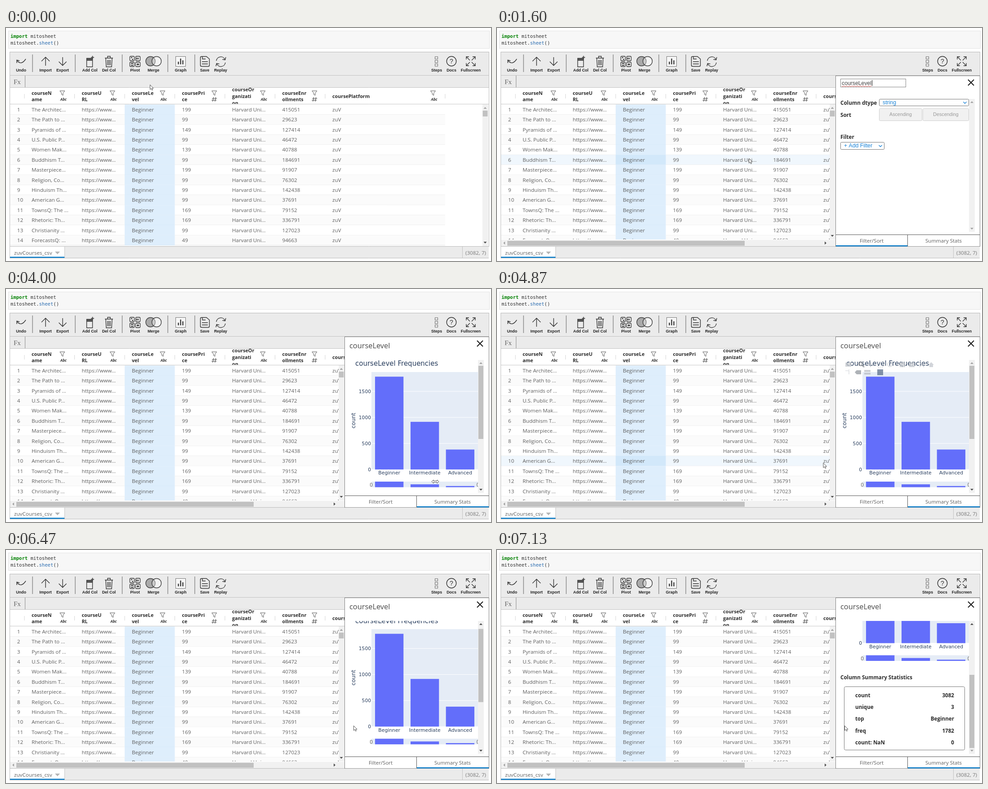
An HTML page with a canvas for the animation above (8000 ms loop, 1079x519 px).

```html
<!DOCTYPE html>
<html lang="en">
<head>
<meta charset="utf-8">
<title>Column summary</title>
<style>
html, body { margin: 0; width: 100%; height: 100%; overflow: hidden; background: #fff; }
canvas { display: block; }
</style>
</head>
<body>
<canvas id="stage" width="1079" height="519"></canvas>
<script>
const ctx = document.getElementById('stage').getContext('2d');
const LOOP = 8000;
const SANS = '"Open Sans", "Noto Sans", sans-serif';
const ARIAL = '"Liberation Sans", Arial, sans-serif';
const CHART = '"DejaVu Sans", sans-serif';
const MONO = '"DejaVu Sans Mono", monospace';
const GREY = '#5e5e5e', INK = '#2b2b2b', BLUE = '#1b84d8';
const ROW_TOP = 170.5, ROW_H = 22.38, COL_X = 41, COL_W = 111.5;

const columns = [
  { lines: ['courseN', 'ame'], type: 'Abc' },
  { lines: ['courseU', 'RL'], type: 'Abc' },
  { lines: ['courseLe', 'vel'], type: 'Abc' },
  { lines: ['coursePri', 'ce'], type: '#' },
  { lines: ['courseOr', 'ganizati', 'on'], type: 'Abc' },
  { lines: ['courseEnr', 'ollments'], type: '#' },
  { lines: ['coursePlatform'], type: 'Abc' }
];
const rows = [
  ['The Architec...', 199, 415051], ['The Path to ...', 99, 29623],
  ['Pyramids of ...', 149, 127414], ['U.S. Public P...', 99, 46472],
  ['Women Mak...', 139, 40788], ['Buddhism T...', 99, 184691],
  ['Masterpiece...', 199, 91907], ['Religion, Co...', 99, 76302],
  ['Hinduism Th...', 99, 142438], ['American G...', 99, 37691],
  ['TownsQ: The ...', 169, 79152], ['Rhetoric: Th...', 169, 336791],
  ['Christianity ...', 99, 127023], ['ForecastsQ: ...', 49, 94663]
].map(([name, price, enrolled]) =>
  [name, 'https://www...', 'Beginner', price, 'Harvard Uni...', enrolled, 'zuV']);

// y is the middle of the capital letters
function text(s, x, y, size = 11.65, color = GREY, family = SANS, style = '', align = 'left') {
  ctx.font = `${style} ${size}px ${family}`;
  ctx.fillStyle = color;
  ctx.textAlign = align;
  ctx.fillText(s, x, y + size * 0.357);
}
const bold = (s, x, y, size = 11.65, align = 'left') => text(s, x, y, size, INK, SANS, 'bold', align);

function rect(x, y, x2, y2, fill, stroke) {
  if (fill) { ctx.fillStyle = fill; ctx.fillRect(x, y, x2 - x, y2 - y); }
  if (stroke) {
    ctx.strokeStyle = stroke; ctx.lineWidth = 1;
    ctx.strokeRect(x + 0.5, y + 0.5, x2 - x - 1, y2 - y - 1);
  }
}
function roundBox(x, y, x2, y2, r, fill, stroke) {
  ctx.beginPath();
  ctx.roundRect(x + 0.5, y + 0.5, x2 - x - 1, y2 - y - 1, r);
  ctx.fillStyle = fill; ctx.fill();
  ctx.strokeStyle = stroke; ctx.lineWidth = 1; ctx.stroke();
}
function path(d, stroke = '#333', width = 1.4, fill) {
  const p = new Path2D(d);
  if (fill) { ctx.fillStyle = fill; ctx.fill(p); }
  if (stroke) { ctx.strokeStyle = stroke; ctx.lineWidth = width; ctx.stroke(p); }
}
function circle(x, y, r, stroke, fill, width = 1.4) {
  ctx.beginPath();
  ctx.arc(x, y, r, 0, 7);
  if (fill) { ctx.fillStyle = fill; ctx.fill(); }
  if (stroke) { ctx.strokeStyle = stroke; ctx.lineWidth = width; ctx.stroke(); }
}
function clipped(x, y, x2, y2, draw) {
  ctx.save();
  ctx.beginPath();
  ctx.rect(x, y, x2 - x, y2 - y);
  ctx.clip();
  draw();
  ctx.restore();
}
const ramp = (t, a, b) => Math.min(1, Math.max(0, (t - a) / (b - a)));
const smooth = p => p * p * (3 - 2 * p);

function drawCode() {
  rect(5, 6, 1076, 46, '#f7f7f7', '#e3e3e3');
  text('import', 10, 18.5, 10.55, '#008000', MONO, 'bold');
  text('mitosheet', 54.4, 18.5, 10.55, '#333', MONO);
  text('mitosheet.', 10, 33.5, 10.55, '#333', MONO);
  text('sheet', 73.5, 33.5, 10.55, '#2a6cb0', MONO);
  text('()', 105.3, 33.5, 10.55, '#333', MONO);
}

function drawToolbar() {
  rect(8, 53, 1074, 133, '#ebebeb');
  path('M8 53.5H1074', '#b5b5b5', 1);
  path('M8 105.5H1074M8 132.5H1074', '#c2c2c2', 1);
  path('M42.5 106V132', '#8a8a8a', 1);
  text('Fx', 17, 119.5, 15, '#666', '"Liberation Serif", serif');
  for (const x of [59, 154, 258.5, 360, 420]) path(`M${x} 59V98`, '#858585', 1.4);

  const labels = { Undo: 33.5, Import: 88, Export: 126, 'Add Col': 186.5, 'Del Col': 229, Pivot: 287,
    Merge: 328, Graph: 388.5, Save: 442, Replay: 477.5, Steps: 958, Docs: 991, Fullscreen: 1034 };
  for (const name in labels) text(name, labels[name], 94, 8.9, '#222', ARIAL, 'bold', 'center');

  path('M25 73Q34 84 44 69M24 78V71.5L30 73');
  path('M88 84V65M79 74L88 65L97 74M126 65V83M117.5 75L126 83.5L134.5 75');
  path('M179.5 67.5H192.5V86.5H179.5Z');
  rect(180, 68, 192, 73, '#555');
  path('M192.5 62V69M189 65.5H196', '#333', 1.5);
  path('M220 67H238M226 67V63H232V67M222 67L223 86.5H235L236 67M226 71V83M229 71V83M232 71V83');
  for (const [x, y] of [[275.5, 63], [288.5, 63], [275.5, 76], [288.5, 76]]) {
    ctx.beginPath(); ctx.roundRect(x, y, 10, 10, 2);
    ctx.strokeStyle = '#333'; ctx.lineWidth = 1.3; ctx.stroke();
  }
  path('M278 66H281M280 70H283M291 66V70M294 66V70M278 79H283M278 83H283M291 81H296M293.5 78.5V83.5', '#333', 1.8);
  circle(321.5, 74, 10.5, '#444', '#aaa');
  circle(335, 74, 10.5, '#444', '#fff6');
  rect(377, 63, 400, 86, '#f7f7f7', '#777');
  path('M383.5 81V75M388.5 81V68M393.5 81V72', '#333', 2.3);
  path('M435 63.5H446L452.5 69V83Q452.5 85.5 450 85.5H435Q432.5 85.5 432.5 83V66Q432.5 63.5 435 63.5ZM437 64V69H444M436 75H449M436 80H449');
  path('M468 73A10 10 0 0 1 487 70M488 77A10 10 0 0 1 469 80M489 65L487.5 71L481.5 70M467 85L468.5 79L474.5 80');
  for (const y of [63.5, 71.5, 79.5]) rect(954, y, 961, y + 6, '#f4f4f4', '#666');
  circle(991, 74, 10.7, '#333');
  text('?', 991, 74, 14, '#333', ARIAL, '', 'center');
  path('M1024 64L1032 72M1044 64L1036 72M1024 84L1032 76M1044 84L1036 76M1024 70V64H1030M1038 64H1044V70M1044 78V84H1038M1030 84H1024V78', '#333', 1.3);
}

function arrow(x, y, dir, color) {
  const [a, b] = dir === 'up' ? [2, -2] : [-2, 2];
  path(dir === 'left' || dir === 'right'
    ? `M${x + (dir === 'left' ? 2 : -2)} ${y - 3.5}v7L${x + (dir === 'left' ? -2 : 2)} ${y}Z`
    : `M${x - 3.5} ${y + a}h7L${x} ${y + b}Z`, null, 0, color);
}

function drawHeader(right, hoverCol) {
  rect(8, 133, right, 170, '#fff');
  clipped(8, 133, right, 169, () => {
    columns.forEach(({ lines, type }, i) => {
      const x = COL_X + COL_W * i, wide = i === 6;
      path(`M${x} 147V157`, '#d5d5d5', 1);
      lines.forEach((line, n) => {
        const y = 152.2 + (n - (lines.length - 1) / 2) * 14.7;
        bold(line, x + 16, y, 10.75);
        if (i === hoverCol) rect(x + 16, y + 5.4, x + 16 + ctx.measureText(line).width, y + 6.4, INK);
      });
      const fx = wide ? 950 : x + 84.3 + (type === '#' ? 3.5 : 0);
      path(`M${fx - 5.5} 140H${fx + 5.5}L${fx + 1.6} 145V150L${fx - 1.6} 148V145Z`, '#555', 1);
      if (type === '#')
        path(`M${fx - 1.5} 154L${fx - 3.5} 164M${fx + 3.5} 154L${fx + 1.5} 164M${fx - 5} 157H${fx + 6}M${fx - 6} 161H${fx + 5}`, '#444', 1);
      else text(type, fx + 2.5, 159.5, 8.3, '#333', SANS, 'italic bold', 'center');
    });
    path('M977 147V157', '#d5d5d5', 1);
  });
  path(`M8 169.5H${right}`, '#c8c8c8', 1);
}

function drawRows(right, bottom, hoverRow) {
  rect(8, 170, right, 487, '#fff');
  clipped(8, 170, right - 14, bottom, () => {
    rows.forEach((cells, i) => {
      const y = ROW_TOP + ROW_H * i, on = i === hoverRow;
      rect(8, y, 977, y + ROW_H, on ? '#f0f7fd' : i % 2 ? '#fbfbfb' : '#fff');
      rect(264, y, 375.5, y + ROW_H, on ? '#d2e8fa' : '#deeefc');
      path(`M8 ${y + ROW_H}H264M375.5 ${y + ROW_H}H977`, '#e6e6e6', 1);
      path(`M264 ${y + ROW_H}H375.5`, '#d3e6f5', 1);
      text(i + 1, i < 9 ? 28 : 31.5, y + 11.3, 11.65, GREY, SANS, '', 'center');
      cells.forEach((cell, c) => text(cell, COL_X + COL_W * c + 16, y + 11.3));
    });
  });
  const x = right - 8;
  rect(right - 14, 170, right - 1, bottom, '#f1f1f1');
  rect(x - 5.5, 184, x + 5.5, 197, '#c1c1c1');
  arrow(x, 178, 'up', '#a3a3a3');
  arrow(x, bottom - 8, 'down', '#505050');
  if (bottom < 480) {
    rect(9, 472, right - 1, 486, '#f1f1f1');
    rect(23, 474, 551, 485, '#c1c1c1');
    arrow(16, 479, 'left', '#a3a3a3');
    arrow(731, 479, 'right', '#505050');
  }
}

function drawFooter() {
  rect(8, 486, 1074, 513, '#ebebeb');
  path('M8 486.5H1074M8 512.5H1074', '#bbb', 1);
  rect(9, 487, 131, 512, '#fff');
  rect(9, 509.5, 131, 512, '#0f80cc');
  path('M130.5 487V512M1015.5 487V512', '#c4c4c4', 1);
  text('zuvCourses_csv', 18, 500.5);
  path('M109 498H120L114.5 504Z', null, 0, '#b5b5b5');
  text('(3082, 7)', 1068, 500.5, 11.65, '#7a7a7a', SANS, '', 'right');
  path('M8.5 53V513M1074.5 53V487', '#bdbdbd', 1);
}

function drawPanelFrame(x, active) {
  rect(x, 106, 1074, 487, '#fff');
  path(`M${x} 106.5H1074.5V487M${x - 0.5} 106V487`, '#808080', 1);
  path('M1048 115L1061 128M1061 115L1048 128', '#222', 2.2);
  clipped(x, 458, 1075, 488, () => {
    const mid = x + 160;
    path(`M${x} 460.5H1074M${mid - 0.5} 460V487`, '#555', 1);
    path(`M${x} 486.5H1074`, '#999', 1);
    text('Filter/Sort', x + 79.5, 474, 11.5, GREY, SANS, '', 'center');
    text('Summary Stats', x + 239.5, 474, 11.5, GREY, SANS, '', 'center');
    rect(active ? mid : x, 484, active ? x + 320 : mid - 1, 486.5, '#0f80cc');
  });
}

function panelScroll(scroll, range) {
  rect(1050, 158, 1063, 454, '#f1f1f1');
  arrow(1056.5, 165, 'up', scroll > 0 ? '#505050' : '#a3a3a3');
  arrow(1056.5, 447, 'down', scroll < range ? '#505050' : '#a3a3a3');
  if (range) {
    const y = 171 + 107 * scroll / range;
    rect(1051, y, 1062, y + 163, '#c1c1c1');
  }
}

function chevron(x, y) { path(`M${x - 3.5} ${y - 1.5}L${x} ${y + 2}L${x + 3.5} ${y - 1.5}`, BLUE, 1.4); }

function drawNameInput(x, focused, caret, marked) {
  rect(x, 113, x + 146, 132, '#fff', '#858585');
  text('courseLevel', x + 3, 122.5, 12.25, '#444', ARIAL);
  if (focused && marked) {
    let d = `M${x + 3} 129`;
    for (let i = 0; i < 22; i++) d += `l1.5 ${i % 2 ? -1.6 : 1.6}l1.5 0`;
    path(d, '#e8504a', 0.9);
  }
  if (caret) rect(x + 70, 116, x + 71, 129, '#111');
}

function drawFilterTab(x, ready) {
  const dy = ready ? 1 : 0, left = ready ? 850 : 902, mid = ready ? 946 : 972;
  bold('Column dtype', x, 166.5);
  if (ready) {
    roundBox(850, 158, 1050, 174, 2, '#fff', '#767676');
    text('string', 858, 166, 12.25, BLUE, ARIAL);
    chevron(1041, 166);
  }
  bold('Sort', x, 193 + dy);
  for (const [label, a, b] of [['Ascending', left, mid], ['Descending', mid + 1, 1050]]) {
    roundBox(a, 178 + dy, b, 206 + dy, 2, '#f1f1f1', '#cfcfcf');
    text(label, (a + b) / 2, 191.5 + dy, 10.7, '#999', ARIAL, '', 'center');
  }
  bold('Filter', x, 241.5 + dy);
  roundBox(x, 253 + dy, x + 98, 270 + dy, 2, '#fff', '#767676');
  text('+ Add Filter', x + 8, 261 + dy, 12.25, BLUE, ARIAL);
  chevron(x + 89, 261.5 + dy);
  panelScroll(0, 0);
}

function drawModebar(alpha) {
  ctx.save();
  ctx.globalAlpha = alpha;
  const c = '#c3c7cd';
  rect(775, 164, 788, 173, c);
  circle(809, 166.5, 4, '#80858c', null, 2.4);
  path('M812 170L817 174', '#80858c', 2.4);
  path('M831 163V174M825.5 168.5H836.5', c, 2);
  ctx.setLineDash([2, 2]);
  path('M847 163H859V174H847Z', c, 1.4);
  ctx.setLineDash([]);
  circle(874, 168, 5, c, null, 1.6);
  for (const [x, d] of [[902, 'h5'], [923, 'h5']]) {
    rect(x - 6, 163, x + 6, 174, c);
    path(`M${x - 2.5} 168.5${d}`, '#fff', 1.5);
  }
  path('M940 163L950 174M950 163L940 174', c, 1.6);
  path('M960 169L966 163L972 169H970V174H962V169Z', null, 0, c);
  path('M775 182H783V190M783 179V181', c, 1.2);
  path('M796 185.5L800 181H810V190H800Z', null, 0, '#92979e');
  path('M817 182.5H831M817 188.5H831', '#b7bbc1', 4);
  rect(846, 179, 859, 192, '#5b6f8c');
  ctx.restore();
}

const bars = [['Beginner', 821, 1782], ['Intermediate', 900, 915], ['Advanced', 978.7, 383]];
const barH = n => n * 0.116;

function drawSummaryTab(scroll, modebar) {
  clipped(755, 158, 1050, 454, () => {
    ctx.translate(0, -scroll);
    const navy = '#2a3f5f';
    rect(813, 185, 1050, 402, '#e5ecf6');
    for (const n of [0, 500, 1000, 1500]) {
      const y = 402 - barH(n);
      path(`M813 ${y}H1050`, '#fff', 1);
      text(n, 812, y, 10.7, navy, CHART, '', 'right');
    }
    rect(813, 429, 1050, 441.5, '#e5ecf6');
    for (const [label, x, n] of bars) {
      rect(x, 402 - barH(n), x + 63.3, 402, '#636efa');
      rect(x, 441.5 - n * 0.007, x + 63.3, 441.5, '#636efa');
      text(label, x + 31.7, 409.5, 10.8, navy, CHART, '', 'center');
    }
    for (const x of [810, 1047.5]) roundBox(x, 432, x + 5, 440, 1, '#fff', '#555');
    text('courseLevel Frequencies', 777, 166, 15, navy, CHART);
    ctx.save();
    ctx.translate(772.5, 293);
    ctx.rotate(-Math.PI / 2);
    text('count', 0, 0, 12.4, navy, CHART, '', 'center');
    ctx.restore();
    if (modebar > 0) drawModebar(modebar);

    bold('Column Summary Statistics', 764, 478.5);
    roundBox(772, 498.5, 1041, 640.5, 3, '#fff', '#777');
    [['count', 3082], ['unique', 3], ['top', 'Beginner'], ['freq', 1782], ['count: NaN', 0]].forEach(([k, v], i) => {
      const y = 518 + 26.3 * i;
      bold(k, 797, y);
      bold(v, 1017, y, 11.65, 'right');
    });
  });
  panelScroll(scroll, 194.5);
}

// time, x, y of the pointer tip
const track = [
  [0, 320, 126], [370, 320, 126], [670, 309, 145], [1270, 309, 145], [1600, 560, 290],
  [2000, 880, 462], [2600, 902, 496], [2750, 902, 496], [3070, 957, 474], [3930, 957, 474],
  [4000, 955, 429], [4530, 964, 409], [4690, 964, 409], [4867, 725, 387], [5000, 725, 388],
  [5333, 773, 391], [8000, 773, 391]
];
function pointerAt(t) {
  const i = Math.max(1, track.findIndex(k => k[0] >= t));
  const [t0, x0, y0] = track[i - 1], [t1, x1, y1] = track[i];
  const p = ramp(t, t0, t1);
  return [x0 + (x1 - x0) * p, y0 + (y1 - y0) * p];
}
function drawPointer(t, x, y) {
  ctx.save();
  ctx.translate(x, y);
  if (t >= 3000 && t < 3990)
    path('M2.5 8V1.5Q4 -.5 5 1.5V6L9.5 7Q11 7.5 10.5 10L9 14.5H4L.5 9.5Q.5 7.5 2.5 8Z', '#444', 1, '#fff');
  else if (t >= 3990 && t < 4720)
    path('M-8 0L-4 -4V-1.5H4V-4L8 0L4 4V1.5H-4V4Z', '#555', 1, '#fff');
  else path('M.5 .5V11L3 8.8L4.8 12.6L6.5 11.8L4.8 8.2H8Z', '#555', 1, '#fff');
  ctx.restore();
}

function draw(t) {
  const open = t >= 1199, ready = t >= 1265, summary = t >= 3599;
  const right = ready ? 754 : open ? 828 : 1074;
  const bottom = ready ? 471 : 486;
  const [px, py] = pointerAt(t);
  const inTable = px < right - 14;
  const hoverRow = inTable && py > ROW_TOP && py < bottom ? Math.floor((py - ROW_TOP) / ROW_H) : -1;
  const hoverCol = inTable && py > 133 && py < 169 ? Math.floor((px - COL_X) / COL_W) : -1;

  rect(0, 0, 1079, 519, '#fff');
  drawCode();
  drawToolbar();
  drawRows(right, bottom, hoverRow);
  drawHeader(right, hoverCol);
  drawFooter();

  if (open) {
    const x = right + 10;
    drawPanelFrame(right, summary);
    if (t >= 3399) text('courseLevel', 764, 126, 16.4, '#4a4a4a');
    else {
      const focused = t < 3265;
      drawNameInput(x, focused, focused && (t - 1199) % 1067 < 533, ready);
    }
    if (summary) {
      const scroll = 83 * smooth(ramp(t, 6400, 6733)) + 111.5 * smooth(ramp(t, 6867, 7133));
      drawSummaryTab(scroll, ramp(t, 4000, 4300) * (1 - ramp(t, 4790, 5090)));
    } else drawFilterTab(x, ready);
  }
  drawPointer(t, px, py);
}

const start = performance.now();
function tick() {
  const t = (performance.now() - start) % LOOP;
  draw(Math.floor((t + 5) * 0.015) / 0.015);
  requestAnimationFrame(tick);
}
tick();
</script>
</body>
</html>
```
